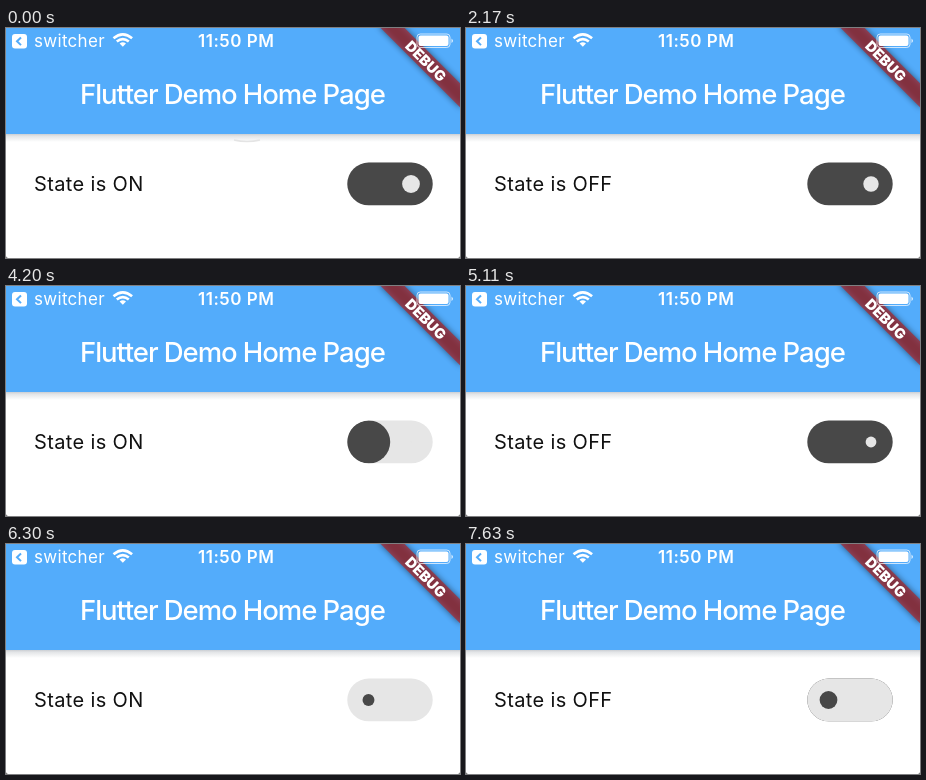
An HTML page for the animation above (8 s loop, 454 px wide and 230 px high).

```html
<!DOCTYPE html>
<html lang="en">
<head>
<meta charset="utf-8">
<title>Switch demo</title>
<style>
  html, body { margin: 0; height: 100%; overflow: hidden; background: #fff; }
  svg { display: block; width: 100vw; height: 100vh; }
  text { font-family: Inter, Roboto, sans-serif; fill: #fff; }
  .status { font-size: 17px; letter-spacing: .3px; }
  .clock { font-weight: 600; letter-spacing: .5px; }
  .title { font-size: 27.5px; font-weight: 500; letter-spacing: -1.05px; }
  .label { font-size: 20px; letter-spacing: .35px; fill: #111; }
  .debug { font-size: 14.5px; font-weight: 900; text-anchor: middle; }
</style>
</head>
<body>
<svg viewBox="0 0 454 230">
  <defs>
    <clipPath id="capsule"><rect x="341.3" y="134.5" width="85.4" height="42.8" rx="21.4"/></clipPath>
    <linearGradient id="shade" x2="0" y2="1">
      <stop stop-color="#bfc4c9"/>
      <stop offset=".35" stop-color="#e3e5e7"/>
      <stop offset="1" stop-color="#fff"/>
    </linearGradient>
    <filter id="blur" x="-20%" y="-60%" width="140%" height="220%"><feGaussianBlur stdDeviation="3"/></filter>
  </defs>

  <rect width="454" height="230" fill="#fff"/>
  <rect y="105" width="454" height="9" fill="url(#shade)"/>
  <rect width="454" height="106" fill="#53acfb"/>
  <path id="smudge" d="M228 112q13 3 26 0" fill="none" stroke="#e4e4e4" stroke-width="1.5"/>

  <g transform="translate(454 -1) rotate(45)">
    <rect x="-57" y="39.8" width="114" height="17" opacity=".5" filter="url(#blur)"/>
    <rect x="-57" y="39.8" width="114" height="17" fill="#b71c1c" fill-opacity=".63"/>
    <text class="debug" y="53.6">DEBUG</text>
  </g>

  <rect x="6" y="6" width="15" height="14.5" rx="3" fill="#fff"/>
  <path d="M15 9.5l-4 3.8 4 3.8" fill="none" stroke="#53acfb" stroke-width="2"/>
  <text class="status" x="28" y="19">switcher</text>
  <g fill="none" stroke="#fff" stroke-width="2.6">
    <path d="M107.5 10.3q9.3-8 18.6 0M110.8 13.6q6-5 12 0"/>
    <path d="M113.6 15.4q3.2-2.4 6.4 0l-3.2 3.4z" fill="#fff" stroke="none"/>
  </g>
  <text class="status clock" x="192" y="19">11:50 PM</text>
  <rect x="411" y="6" width="33" height="13.5" rx="3.2" fill="none" stroke="#fff" stroke-opacity=".7"/>
  <rect x="412.5" y="7.5" width="30" height="10.5" rx="2" fill="#fff"/>
  <path d="M445.5 10.5q3 2.3 0 4.6z" fill="#fff" opacity=".8"/>

  <text class="title" x="74" y="76">Flutter Demo Home Page</text>
  <text class="label" id="label" x="28" y="163"></text>

  <g clip-path="url(#capsule)">
    <rect id="track" x="341" y="134" width="87" height="44"/>
    <circle id="spot" cy="156"/>
    <circle id="knob" cy="156"/>
  </g>
  <path d="M0 227.5q0 2.5 2.5 2.5H0zM454 227.5q0 2.5-2.5 2.5h2.5z" fill="#555"/>
</svg>
<script>
const LOOP = 8000, DARK = '#484848', LIGHT = '#e6e6e6', KNOB = 8.9;
const LEFT = 362.5, RIGHT = 405;
// Each toggle: start time and how far into the transition it begins, in ms
const toggles = [[-2000, 0], [2030, -70], [3850, 0], [4900, 0], [6230, 105], [7070, 0]];
const el = id => document.getElementById(id);
const set = (id, attrs) => { for (const k in attrs) el(id).setAttribute(k, attrs[k]); };
const ramp = (t, from, to) => Math.min(1, Math.max(0, (t - from) / (to - from)));

// The old knob shrinks, then swells until it fills the capsule
function spotRadius(t) {
  const grow = ramp(t, 240, 460);
  return KNOB - 4 * ramp(t, 0, 240) + 66 * grow * grow;
}

function draw(time) {
  const index = toggles.findLastIndex(([start]) => time >= start);
  const [start, lead] = toggles[index];
  const t = time - start + lead;
  const on = index % 2 === 0;
  const [before, after] = on ? [LIGHT, DARK] : [DARK, LIGHT];
  const appear = 1 - (1 - ramp(t, 340, 540)) ** 2;

  set('track', { fill: before });
  set('spot', { cx: on ? LEFT : RIGHT, r: spotRadius(t), fill: after });
  set('knob', { cx: on ? RIGHT : LEFT, r: KNOB * appear, fill: before });
  set('smudge', { opacity: 1 - ramp(time, 0, 350) });
  const text = 'State is ' + (on ? 'ON' : 'OFF');
  if (el('label').textContent !== text) el('label').textContent = text;
}

function frame() {
  draw(performance.now() % LOOP);
  requestAnimationFrame(frame);
}
frame();
</script>
</body>
</html>
```
